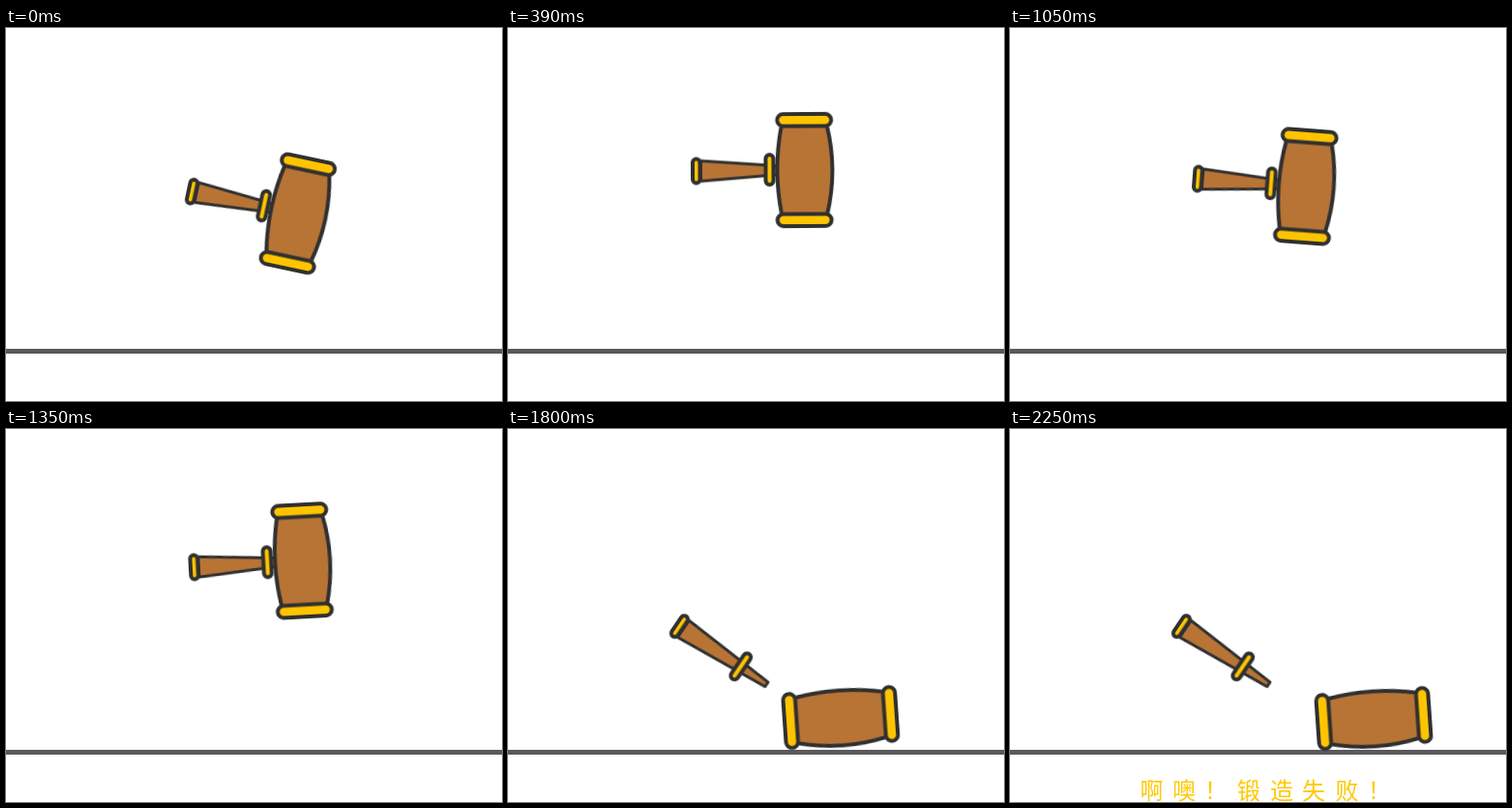
Write an HTML page that moves like this. It is 513 px wide and 386 px high and loops after 2430 ms.

```html
<!DOCTYPE html>
<html lang="zh">
<head>
<meta charset="utf-8">
<title>锻造失败</title>
<style>
  html, body { margin: 0; width: 100%; height: 100%; overflow: hidden; background: #fff; }
  svg { display: block; width: 513px; height: 386px; }

  .wood { fill: #b87435; stroke: #303030; stroke-linejoin: round; }
  .gold { fill: #ffc400; stroke: #303030; stroke-width: 4; }
  .ground { fill: #5b595e; }

  .swing {
    transform-origin: 95px 148px;
    animation: swing 2430ms cubic-bezier(.37, 0, .63, 1) infinite;
  }
  .fall {
    transform-origin: 270.3px 266.3px;
    animation: fall 2430ms linear infinite;
  }
  .message {
    font: 24px "Noto Sans CJK TC", "Noto Sans CJK SC", "Noto Sans CJK", sans-serif;
    fill: #ffc800;
    text-anchor: middle;
    animation: show 2430ms step-end infinite;
  }

  /* two light taps, then a full wind-up and strike */
  @keyframes swing {
    0%, 24.691%, 49.383% { transform: rotate(12deg); }
    12.346%, 37.037% { transform: rotate(-3.5deg); }
    61.728% { transform: rotate(-18deg); }
    71.605%, 100% { transform: rotate(34deg); }
  }
  /* the head snaps off, tips over and slides along the ground */
  @keyframes fall {
    0%, 71.605% { transform: translate(0, 0) rotate(0deg); }
    74.074% {
      transform: translate(73.2px, 32.2px) rotate(52deg);
      animation-timing-function: ease-out;
    }
    81.481% {
      transform: translate(111.2px, 33px) rotate(52deg);
      animation-timing-function: cubic-bezier(.37, 0, .63, 1);
    }
    92.593%, 100% { transform: translate(105.7px, 33.2px) rotate(52deg); }
  }
  @keyframes show {
    0% { opacity: 0; }
    81.481%, 100% { opacity: 1; }
  }
</style>
</head>
<body>
<svg viewBox="0 0 513 386">
  <rect class="ground" y="332" width="513" height="5"/>

  <g class="swing">
    <path class="wood" stroke-width="3" d="M199.5 138 L303 145.3 V150.7 L199.5 159Z"/>
    <rect class="gold" x="191" y="136" width="7.5" height="25" rx="3.7"/>
    <rect class="gold" x="266.5" y="132" width="8" height="31" rx="4"/>
  </g>

  <g class="fall">
    <g class="swing">
      <path class="wood" stroke-width="4" d="M283 102 Q274 148 283 194 H330 Q341 148 330 102Z"/>
      <rect class="gold" x="278.5" y="90" width="56" height="12.5" rx="6.2"/>
      <rect class="gold" x="278.5" y="193.5" width="56" height="12.5" rx="6.2"/>
    </g>
  </g>

  <text class="message" y="383" x="146.5 180 213 247 281 314 348.5 382">啊噢！锻造失败！</text>
</svg>
</body>
</html>
```
